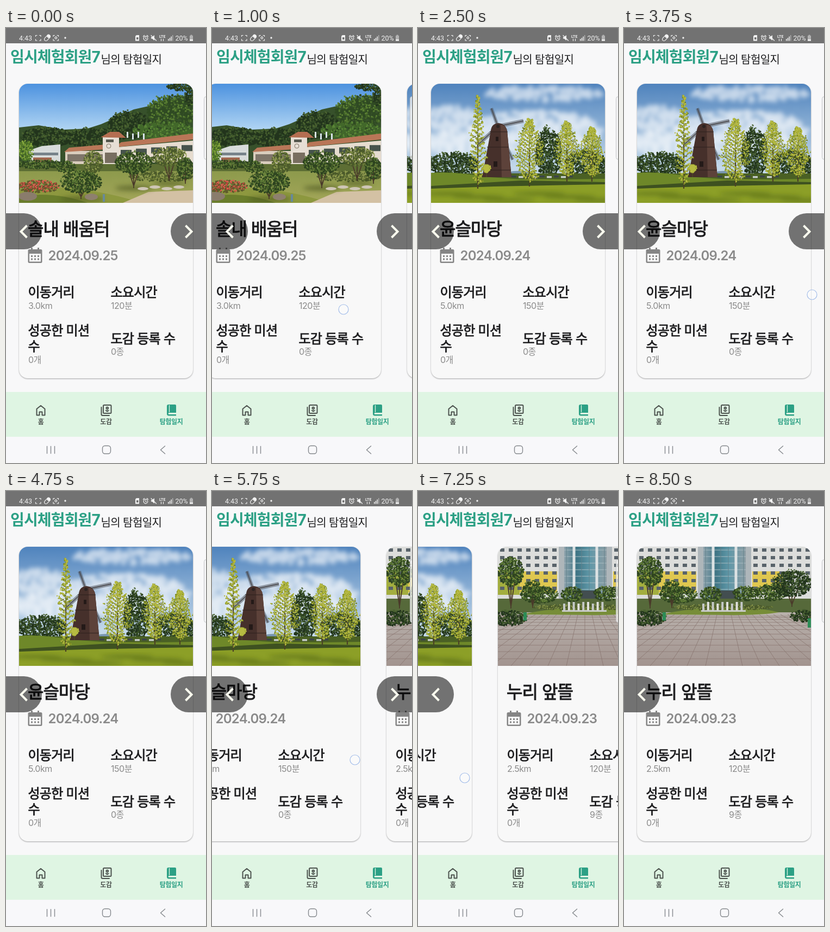
An HTML page that plays this animation: 368 by 796 pixels, repeating every 8750 ms.

```html
<!DOCTYPE html>
<html lang="ko">
<head>
<meta charset="utf-8">
<title>탐험일지</title>
<style>
html, body { margin: 0; width: 100%; height: 100%; overflow: hidden; background: #f8f8f9; }
svg { display: block; width: 100%; height: 100%; }
text { font-family: Inter, "Noto Sans CJK KR", "Noto Sans CJK", sans-serif; letter-spacing: -.03em; fill: #1c1c1e; }
.title { font-size: 32px; stroke: #1c1c1e; stroke-width: 1px; }
.date { font-size: 24px; font-weight: 600; fill: #8a8a8a; }
.label { font-size: 24px; stroke: #1c1c1e; stroke-width: .8px; }
.value { font-size: 16px; fill: #8b8b8b; }
.tab { font-size: 12px; font-weight: 600; fill: #4c524e; text-anchor: middle; }
.on { fill: #2ca085; }
.status text { font: 12.5px Roboto, Inter, sans-serif; letter-spacing: 0; fill: #f2f2f2; }
.line { fill: none; stroke-linecap: round; stroke-linejoin: round; }
.chevron { fill: none; stroke: #fafbee; stroke-width: 4; }
.card { filter: drop-shadow(0 1.2px 1.3px rgba(0, 0, 0, .34)); }

#strip { animation: scroll 8750ms infinite; }
#touch { animation: touch 8750ms infinite; }
#next { animation: next 8750ms step-end infinite; }

/* The screen refreshes every 250 ms, so every move is stepped. */
@keyframes scroll {
  0%, 8.57% { transform: translateX(0); animation-timing-function: steps(1); }
  11.42% { transform: translateX(-33px); animation-timing-function: steps(4); }
  22.85% { transform: translateX(-189px); animation-timing-function: steps(1); }
  25.71% { transform: translateX(-340px); animation-timing-function: steps(1); }
  28.57%, 60% { transform: translateX(-368px); animation-timing-function: steps(1); }
  62.85% { transform: translateX(-416px); animation-timing-function: steps(1); }
  65.71% { transform: translateX(-439px); animation-timing-function: steps(6); }
  82.85% { transform: translateX(-613px); animation-timing-function: steps(1); }
  85.71% { transform: translateX(-706px); animation-timing-function: steps(1); }
  88.57% { transform: translateX(-733px); animation-timing-function: steps(1); }
  91.42%, 100% { transform: translateX(-736px); }
}
@keyframes touch {
  0% { transform: translate(275px, 513px); opacity: 0; animation-timing-function: steps(1); }
  8.57% { transform: translate(275px, 513px); opacity: 1; animation-timing-function: steps(1); }
  11.42% { transform: translate(242px, 515px); opacity: 1; animation-timing-function: steps(4); }
  22.85% { transform: translate(95px, 528px); opacity: 1; animation-timing-function: steps(1); }
  25.71% { transform: translate(346px, 488px); opacity: 0; animation-timing-function: steps(1); }
  42.85% { transform: translate(346px, 488px); opacity: 1; animation-timing-function: steps(1); }
  45.71% { transform: translate(286px, 490px); opacity: 0; animation-timing-function: steps(1); }
  62.85% { transform: translate(286px, 490px); opacity: 1; animation-timing-function: steps(1); }
  65.71% { transform: translate(263px, 492px); opacity: 1; animation-timing-function: steps(6); }
  82.85% { transform: translate(86px, 525px); opacity: 1; animation-timing-function: steps(1); }
  85.71%, 100% { transform: translate(86px, 525px); opacity: 0; }
}
@keyframes next {
  0% { opacity: 1; }
  77.14%, 100% { opacity: 0; }
}
</style>
</head>
<body>
<svg viewBox="0 0 368 796" preserveAspectRatio="none">
  <defs>
    <clipPath id="top"><path d="M24 320V118a16 16 0 0 1 16-16H328a16 16 0 0 1 16 16V320Z"/></clipPath>
    <filter id="soft" x="-30%" y="-30%" width="160%" height="160%"><feGaussianBlur stdDeviation="4"/></filter>
    <linearGradient id="sky0" x2="0" y2="1"><stop stop-color="#4c92df"/><stop offset=".4" stop-color="#b4d7f4"/></linearGradient>
    <linearGradient id="sky1" x2="0" y2="1"><stop stop-color="#4f83bd"/><stop offset=".7" stop-color="#c3d8ea"/></linearGradient>
    <linearGradient id="lawn" x2="0" y2="1"><stop stop-color="#8d9a4c"/><stop offset="1" stop-color="#a3a659"/></linearGradient>
    <linearGradient id="pave" x2="0" y2="1"><stop stop-color="#b9b1ac"/><stop offset="1" stop-color="#a2948f"/></linearGradient>
    <linearGradient id="glass" x2="1" y2="0"><stop stop-color="#8fa3ad"/><stop offset=".3" stop-color="#3f7585"/><stop offset=".6" stop-color="#5f98a8"/><stop offset="1" stop-color="#8d9ca3"/></linearGradient>
  </defs>
  <rect width="368" height="796" fill="#f8f8f9"/>
  <text x="8" y="62.500" class="on" font-size="28" font-weight="700">임시체험회원7</text>
  <text x="174.500" y="64.500" font-size="20">님의 탐험일지</text>

  <g id="strip"></g>

  <rect x="364.500" y="125.500" width="12" height="115" rx="4" fill="#f4f4f4" fill-opacity=".75" stroke="#c4c6c8"/>
  <path d="M0 339H33a33 33 0 0 1 0 66H0Z" fill-opacity=".54"/>
  <path class="chevron" d="M38.500 361.500 27.500 372.500 38.500 383.500"/>
  <g id="next">
    <path d="M368 339H336a33 33 0 0 0 0 66H368Z" fill-opacity=".54"/>
    <path class="chevron" d="M330.500 361.500 341.500 372.500 330.500 383.500"/>
  </g>

  <rect y="666" width="368" height="82" fill="#dff5e3"/>
  <g class="line" stroke="#4c524e" stroke-width="2">
    <path d="M56.500 697 64 691l7.500 6v11.500h-5v-6h-5v6h-5Z"/>
    <rect x="179" y="690" width="14.500" height="15" rx="1.500"/>
    <path d="M175.500 694v13a2 2 0 0 0 2 2H190"/>
    <path d="M186.300 702v-3M183.500 699.500q2.800 4 5.600 0" stroke-width="1.500"/>
    <circle cx="186.300" cy="695.500" r="1.800"/>
  </g>
  <path d="M299 689h12a2 2 0 0 1 2 2v13h-13a1.500 1.500 0 0 0 0 3h13v2.500h-13.500a3.500 3.500 0 0 1-3.500-3.500V692a3 3 0 0 1 3-3Z" fill="#2ca085"/>
  <path d="M300.500 690v13" stroke="#dff5e3" stroke-width="1.300"/>
  <text class="tab" x="64" y="724.500">홈</text>
  <text class="tab" x="184" y="724.500">도감</text>
  <text class="tab on" x="304" y="724.500">탐험일지</text>

  <rect y="748" width="368" height="48" fill="#f8f8fa"/>
  <g class="line" stroke="#85898d" stroke-width="1.400">
    <path d="M75.500 765.500v13M82.500 765.500v13M89.500 765.500v13M292.500 765l-8 7 8 7"/>
    <rect x="177.500" y="764.500" width="15" height="14.500" rx="4.500"/>
  </g>

  <g class="status">
    <rect width="368" height="28" fill="#727272"/>
    <text x="24" y="22.500">4:43</text>
    <text x="311.500" y="22.500">20%</text>
    <text x="282" y="17.500" style="font-size:7px;font-weight:700">LTE</text>
    <g class="line" stroke="#f2f2f2" stroke-width="1.200">
      <path id="scan" d="M54.500 15.500v-2h2.500M61.500 13.500h2.500v2M64 20.500v2.500h-2.500M57 23h-2.500v-2.500"/>
      <use href="#scan" x="32.500"/>
      <circle cx="91.800" cy="18" r="1.800"/>
      <rect x="-6.500" y="-3" width="13" height="6" rx="3" transform="translate(76 18) rotate(-45)"/>
      <circle cx="257" cy="19" r="3.800"/>
      <path d="M257 17v2.200l1.500 1M252.500 15.500l2-2M261.500 15.500l-2-2M267 13.500l9.500 9.500M285.500 20v3.500M289.500 20v3.500"/>
    </g>
    <g fill="#f2f2f2">
      <rect x="75" y="12" width="7" height="6" rx="3" transform="rotate(45 78.500 15)"/>
      <circle cx="109" cy="18" r="1.700"/>
      <path d="M238 15l2-2h5v10.500h-7ZM267 16.500h2l4-3.500v10l-4-3.500h-2ZM298 20h1.500v3.500H298ZM300.700 18h1.500v5.500h-1.500ZM303.400 15.500h1.500v8h-1.500Z"/>
      <path d="M306 13h1.400v10.500H306ZM338 14h1.500v-1.500h3V14h1.500v9.500h-6Z" fill-opacity=".5"/>
      <path d="M338 21h6v2.500h-6Z"/>
    </g>
    <path d="M240 17h3.500v4H240Z" fill="#727272"/>
  </g>
  <circle id="touch" r="9" fill="#fff" fill-opacity=".35" stroke="#a3bde9" stroke-width="1.200"/>
</svg>

<script>
let seed = 7;
const rnd = () => (seed = seed * 16807 % 2147483647) / 2147483647;
const times = (n, fn) => Array.from({ length: n }, (_, i) => fn(i)).join('');
const rect = (x, y, w, h, fill) => `<rect x="${x}" y="${y}" width="${w}" height="${h}" fill="${fill}"/>`;
const oval = (x, y, rx, ry, fill) => `<ellipse cx="${x}" cy="${y}" rx="${rx}" ry="${ry}" fill="${fill}"/>`;
const shape = (d, fill) => `<path d="${d}" fill="${fill}"/>`;
const stroke = (d, color, w = 1, cap = 'butt') => `<path d="${d}" fill="none" stroke="${color}" stroke-width="${w}" stroke-linecap="${cap}"/>`;
const dot = (x, y) => `M${x.toFixed(1)} ${y.toFixed(1)}h.01`;
const soft = (s, alpha) => `<g filter="url(#soft)" opacity="${alpha}">${s}</g>`;

// Fine foliage in an ellipse; later, lighter colours sit higher and cover less
const leaves = (cx, cy, rx, ry, colors, r = 1.7) => colors.map((color, c) =>
  stroke(times(Math.ceil(rx * ry / r / r * (c ? .4 : 1.5)), () => {
    const a = rnd() * 6.283, d = Math.sqrt(rnd());
    return dot(cx + Math.cos(a) * rx * d, cy + Math.sin(a) * ry * d - c * ry * .08);
  }), color, r * (c ? 1.5 : 2), 'round')).join('');

const tree = (cx, cy, rx, ry, base, colors) =>
  stroke(`M${cx} ${base}V${cy}M${cx - rx * .4} ${cy}L${cx} ${base - 4}L${cx + rx * .4} ${cy}`, '#4a3a2a', 1.8) +
  leaves(cx, cy, rx, ry, colors);

// Trunk with rising branches, leaves scattered along each of them
const ginkgo = (x, top, base, w) => {
  const layers = ['', '', ''];
  let wood = `M${x} ${base}V${top + 4}`;
  const h = base - 16 - top;
  for (let i = 0; i < 34; i++) {
    const k = i / 33, side = i % 2 ? 1 : -1;
    const y = top + 6 + k * h, len = w * Math.min(1, .15 + k * 1.5) * (.65 + rnd() * .35) * (k > .85 ? .6 : 1);
    wood += `M${x} ${y.toFixed(1)}l${(side * len * .8).toFixed(1)} ${(-len * .55).toFixed(1)}`;
    for (let j = 0; j < 8 + w * .5; j++) {
      const t = rnd();
      layers[j % 3] += dot(x + side * len * t + (rnd() - .5) * 3, y - len * .6 * t + (rnd() - .5) * 5);
    }
  }
  return stroke(wood, '#5a5426', 1) + stroke(`M${x} ${base}V${base - h * .6}`, '#4b4126', 2.2) +
    layers.map((d, i) => stroke(d, ['#74821f', '#96a32c', '#b7ba42'][i], 2.4, 'round')).join('');
};

const dark = ['#22341c', '#344c26', '#48602f'];
const green = ['#2d431f', '#466229', '#66823a'];
const olive = ['#4b5a2a', '#6d7d3a', '#8f9a50'];
const white = ['#fff', '#fff'];

const school = () =>
  rect(24, 102, 320, 218, 'url(#sky0)') +
  shape('M24 182 60 178 105 186 150 184 175 176 205 163 235 149 262 143 344 120V260H24Z', '#37512b') +
  leaves(75, 200, 50, 17, dark, 2.2) + leaves(160, 202, 50, 18, dark, 2.2) +
  leaves(228, 178, 40, 25, dark, 2.2) + leaves(305, 155, 45, 32, ['#2f4a22', '#446528', '#5b8033'], 2.2) +
  leaves(290, 188, 56, 16, ['#42682a', '#598436'], 2.2) +
  leaves(322, 108, 26, 7, dark) + leaves(337, 124, 8, 18, dark) +
  shape('M42 224 66 216 100 213V245H42Z', '#d8dcdb') + rect(50, 228, 46, 5, '#77838a') + rect(50, 237, 34, 8, '#a0674e') +
  rect(109, 225, 75, 28, '#d9cdbd') + shape('M107 227 116 219 184 213V222Z', '#b97758') +
  rect(113, 231, 65, 13, '#7f766a') +
  shape('M205 218 344 206V246H205Z', '#e6dccf') + shape('M201 217 212 209 344 193V204L203 218Z', '#b97657') +
  times(5, i => shape(`M${211 + i * 28} ${223 - i * 2.2}h20v11h-20Z`, '#46534c')) +
  rect(178, 199, 30, 56, '#e6ded4') + shape('M174 200 191 190H208L221 201Z', '#b46e51') +
  rect(184, 204, 14, 5, '#57594f') + '<circle cx="189" cy="216" r="4" fill="none" stroke="#807565"/>' + rect(182, 228, 22, 19, '#786e60') +
  times(4, i => rect(222 + i * 10, 190 + i % 2 * 3, 3, 11, '#d9e4ea')) +
  rect(24, 249, 320, 16, '#5d6e34') + rect(24, 262, 320, 58, 'url(#lawn)') +
  shape('M24 295Q130 282 250 320H24Z', '#8d983f') + shape('M215 320 262 300 344 297V320Z', '#d3c1a4') + shape('M24 308Q90 298 150 320H24Z', '#6a7d2c') +
  leaves(36, 225, 15, 18, ['#4d7327', '#6b902f', '#8bab42']) + leaves(65, 250, 44, 8, green) +
  leaves(110, 254, 18, 11, green) + leaves(160, 246, 18, 20, olive) + leaves(285, 272, 58, 9, olive) +
  soft(oval(235, 293, 34, 5, '#46511f') + oval(140, 313, 40, 5, '#46511f') + oval(300, 284, 30, 4, '#46511f'), .6) +
  tree(300, 236, 33, 17, 280, olive) + tree(235, 247, 34, 20, 293, green) + tree(330, 257, 15, 19, 285, green) +
  leaves(60, 290, 40, 11, ['#5e5a2c', '#b8443a', '#dc5a50']) + tree(138, 282, 38, 20, 313, green) +
  oval(40, 308, 17, 8, '#8a7c6c') + oval(157, 309, 12, 6, '#8e806e') +
  times(4, i => oval(252 + i * 22, 294 - i % 2 * 3, 10, 3, '#cfc6b6')) +
  rect(178, 304, 4, 14, '#68899a');

const blade = (x, y, w) => stroke(`M147 180L${x} ${y}`, '#453d3b', 1.3) + stroke(`M147 180L${x} ${y}`, 'rgba(75,78,86,.5)', w);
const mill = () =>
  rect(24, 102, 320, 218, 'url(#sky1)') +
  soft(leaves(230, 120, 110, 14, white, 4) + leaves(62, 168, 52, 26, white, 4), .65) +
  soft(leaves(215, 190, 125, 38, white, 4) + leaves(60, 212, 56, 22, white, 4), .7) +
  shape('M150 268Q185 255 215 268V275H150Z', '#7895ae') +
  leaves(65, 250, 46, 22, dark) + leaves(240, 230, 24, 46, dark) + leaves(310, 250, 40, 25, dark) +
  rect(24, 266, 320, 18, '#4a6024') + rect(24, 277, 320, 43, '#8c9f27') +
  shape('M24 265Q70 262 118 272L205 278 344 276V282L150 287 24 289Z', '#6e8829') +
  shape('M24 289 190 279 344 282V286L140 290 24 294Z', '#3e5120') +
  soft(times(6, i => oval(55 + i * 56, 303 + i % 3 * 6, 48, 3, '#4f6418')), .65) +
  times(9, i => rect(172 + i * 13, 270 + i % 2, 9, 3.5, i % 2 ? '#c5cbcb' : '#3b4447')) +
  blade(135, 147, 6) + blade(194, 170, 7) + blade(111, 213, 7) + blade(174, 241, 6) +
  shape('M134 188Q135 175 148 174Q161 175 164 188L172 273H118Z', '#46302b') + shape('M152 177Q162 178 164 188L172 273H154Z', '#5d423a') +
  rect(143, 199, 5, 8, '#241a18') + rect(139, 244, 7, 10, '#241a18') +
  stroke('M132 190H165M127 218H167M121 260H171', '#2c211f', 1.2) +
  oval(147, 180, 3, 3, '#2c2422') +
  ginkgo(110, 120, 294, 17) + ginkgo(126, 247, 273, 8) + ginkgo(205, 163, 290, 31) + ginkgo(274, 168, 281, 28) + ginkgo(320, 178, 281, 28);

const wing = (x, cols) => times(cols * 6, i => rect(x + i % cols * 16, 105 + Math.floor(i / cols) * 14, 8, 6, '#59636a'));
const yard = () =>
  rect(24, 102, 320, 120, '#dcdddb') +
  rect(24, 145, 40, 45, '#a3ae3f') + rect(64, 147, 69, 39, '#dfc750') + rect(236, 147, 56, 35, '#dfc750') + rect(298, 147, 46, 30, '#c8cac8') +
  wing(28, 7) + wing(238, 7) +
  rect(136, 102, 98, 100, '#aeb6ba') + rect(146, 102, 78, 96, 'url(#glass)') +
  times(8, i => stroke(`M146 ${108 + i * 12}H224`, '#a9bcc2', 1)) +
  times(6, i => stroke(`M${150 + i * 14} 102V198`, i % 3 === 1 ? '#dce2e3' : '#60818b', i % 3 === 1 ? 5 : 1)) +
  rect(160, 182, 50, 22, '#434e50') + rect(24, 197, 320, 26, '#56693a') +
  rect(24, 222, 320, 98, 'url(#pave)') +
  shape('M68 226Q120 214 184 213T285 222Q250 228 184 227T68 226Z', '#778d38') +
  times(27, i => stroke(`M${184 + (i - 13) * 13} 226L${184 + (i - 13) * 34} 320`, '#85706a', .7)) +
  times(12, i => stroke(`M24 ${(229 + i * 2 + i * i * .58).toFixed(1)}H344`, '#87736d', .7)) +
  leaves(100, 190, 35, 15, green) + leaves(160, 189, 20, 13, green) + leaves(225, 188, 25, 13, green) + leaves(270, 186, 30, 15, green) +
  leaves(180, 213, 94, 5, olive, 1.4) +
  tree(48, 148, 24, 27, 215, green) + tree(88, 182, 18, 17, 214, green) + tree(309, 170, 36, 24, 212, dark) +
  leaves(45, 233, 33, 14, dark) + leaves(330, 229, 24, 11, dark) +
  times(9, i => rect(144 + i * 8.8, i % 3 ? 203 : 206, 4, i % 3 ? 16 : 13, i % 2 ? '#e0e0dd' : '#c4c8c7')) + rect(142, 218, 82, 3, '#c9cbc8') +
  rect(71, 222, 6, 15, '#2d8c56') + rect(338, 233, 6, 17, '#2d8c56');

const calendar =
  shape('M43 405h3v-3h3v3h9v-3h3v3h3a2.500 2.500 0 0 1 2.500 2.500v20a2.500 2.500 0 0 1-2.500 2.500H43a2.500 2.500 0 0 1-2.500-2.500v-20A2.500 2.500 0 0 1 43 405Z', '#858585') +
  rect(43, 413, 21, 14.5, '#f8f8f8') +
  times(6, i => rect(46 + i % 3 * 6, 416 + Math.floor(i / 3) * 5.5, 3, 3, '#858585'));
const label = (x, y, s, cls = 'label') => `<text x="${x}" y="${y}" class="${cls}">${s}</text>`;

const card = ({ photo, title, date, km, min, found }, i) => `<g transform="translate(${i * 368})">
  <rect class="card" x="24" y="102" width="320" height="539" rx="16" fill="#f8f8f8"/>
  <g clip-path="url(#top)">${photo()}</g>${calendar}` +
  label(40, 378.5, title, 'title') + label(77.5, 425, date, 'date') +
  label(40.5, 492, '이동거리') + label(41, 514, km + 'km', 'value') +
  label(192.5, 492, '소요시간') + label(193, 514, min + '분', 'value') +
  label(40.5, 562, '성공한 미션') + label(40.5, 591, '수') + label(41, 613, '0개', 'value') +
  label(192.5, 576.5, '도감 등록 수') + label(193, 598, found + '종', 'value') + '</g>';

document.getElementById('strip').innerHTML = [
  { photo: school, title: '솔내 배움터', date: '2024.09.25', km: '3.0', min: 120, found: 0 },
  { photo: mill, title: '윤슬마당', date: '2024.09.24', km: '5.0', min: 150, found: 0 },
  { photo: yard, title: '누리 앞뜰', date: '2024.09.23', km: '2.5', min: 120, found: 9 },
].map(card).join('');
</script>
</body>
</html>
```
